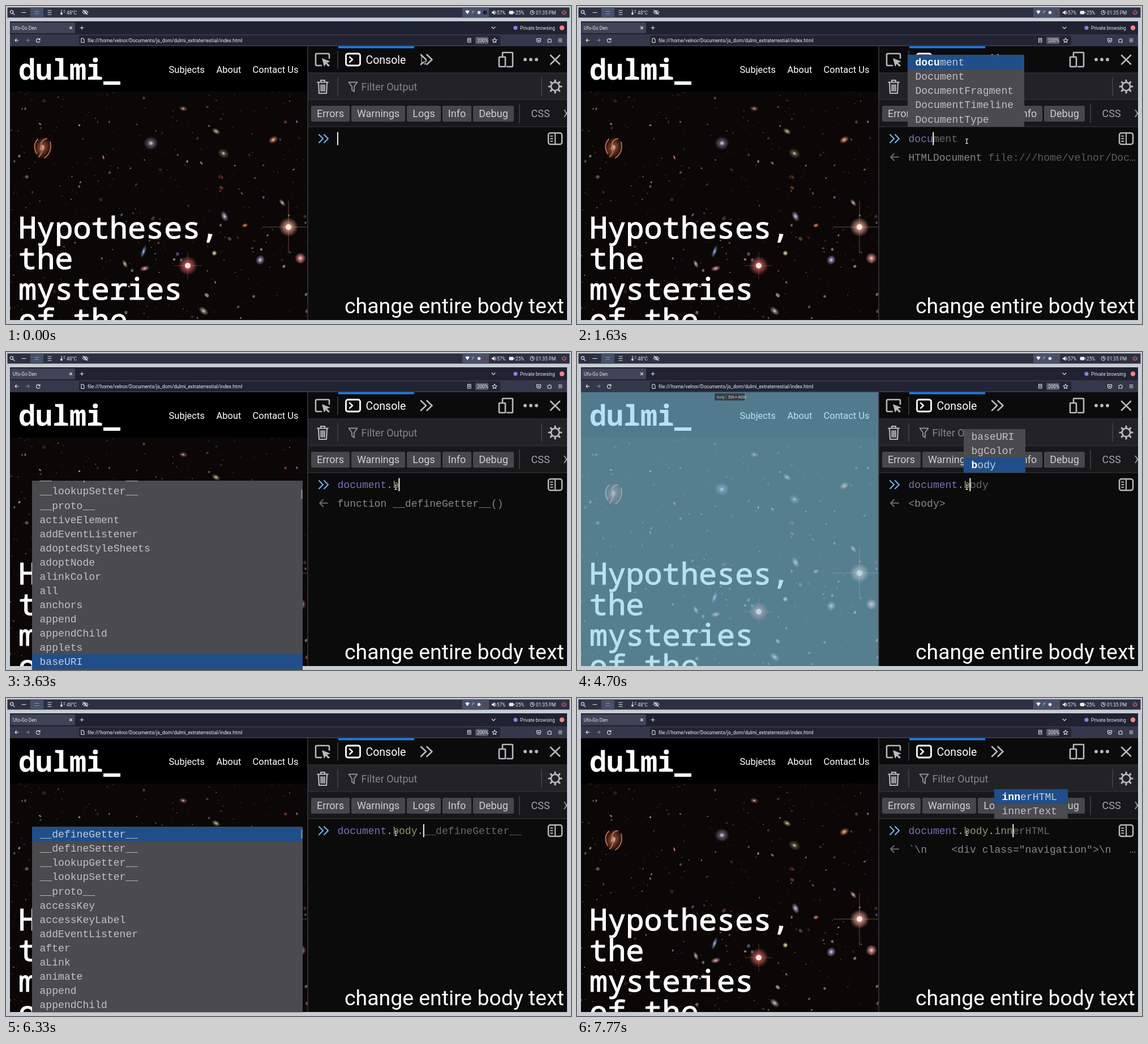
Write an HTML page that moves like this. It is 998 px wide and 561 px high and loops after 8 s.

```html
<!DOCTYPE html>
<html lang="en">
<head>
<meta charset="utf-8">
<title>Console demo</title>
<style>
html, body { margin: 0; width: 100%; height: 100%; overflow: hidden; background: #c7cdd4; }
svg { display: block; width: 998px; height: 561px; font-family: Roboto, sans-serif; }
text { white-space: pre; }
.mono { font: 18.08px "Liberation Mono", monospace; }
.title { font-family: "Noto Sans Mono", monospace; fill: #fff; }
.headline { font-size: 53.6px; font-weight: 400; stroke: #fff; stroke-width: 1.1px; }
.small { font-size: 8.3px; fill: #e4e5ea; }
.tool { font-size: 18px; }
.line { fill: none; stroke-linecap: round; stroke-linejoin: round; }
</style>
</head>
<body>
<svg id="stage" viewBox="0 0 998 561">
  <defs>
    <clipPath id="pageClip"><rect x="7" y="71" width="526" height="483"/></clipPath>
    <clipPath id="windowClip"><rect x="7" y="27" width="984" height="527"/></clipPath>
  </defs>
  <g id="desktop"></g>
  <g id="page" clip-path="url(#pageClip)"></g>
  <g id="tools" clip-path="url(#windowClip)"></g>
  <g id="live"></g>
  <rect id="caret" y="222.5" width="2" height="23" fill="#f4f4f5"/>
  <text x="598" y="542" font-size="37.4" fill="#fff">change entire body text</text>
  <g id="pointer">
    <path id="arrow" d="M0 0V13L3.2 10.2L5.4 15L7.6 14L5.4 9.4H9.6Z" fill="#111" stroke="#ddd" stroke-width="1"/>
    <g id="beam" class="line">
      <path d="M-2-4H2M-2 4H2M0-4V4" stroke="#111" stroke-width="2.4"/>
      <path d="M-2-4H2M-2 4H2M0-4V4" stroke="#eee" stroke-width="1.2"/>
    </g>
  </g>
</svg>
<script>
const LOOP = 8000, CHAR = 10.85, ROW = 25.05, INPUT_X = 585.5;
const $ = id => document.getElementById(id);
const esc = s => s.replace(/&/g, '&amp;').replace(/</g, '&lt;');
const text = (x, y, s, attrs = '') => `<text x="${x}" y="${y}" ${attrs}>${esc(s)}</text>`;
const rect = (x, y, w, h, fill, attrs = '') =>
  `<rect x="${x}" y="${y}" width="${w}" height="${h}" fill="${fill}" ${attrs}/>`;
const line = (d, color = '#b9b9bc', width = 2.6) =>
  `<path class="line" d="${d}" stroke="${color}" stroke-width="${width}"/>`;
const dot = (x, y, r, fill) => `<circle cx="${x}" cy="${y}" r="${r}" fill="${fill}"/>`;
const ring = (x, y, r, color, width) =>
  `<circle cx="${x}" cy="${y}" r="${r}" fill="none" stroke="${color}" stroke-width="${width}"/>`;
const mono = (x, y, s, fill, bold) =>
  text(x, y, s, `class="mono" fill="${fill}"` + (bold ? ' style="font-weight:700"' : ''));

function drawDesktop() {
  const ink = '#dfe1e8';
  const small = (x, y, s) => text(x, y, s, 'class="small"');
  const thin = (d, c = ink) => line(d, c, 1.1);
  $('desktop').innerHTML = [
    rect(0, 0, 998, 561, '#c7cdd4'),
    rect(2.5, 2.5, 993, 18, '#2c3041'),
    rect(43, 2.5, 23, 18, '#465069'),
    ring(10, 10.5, 2.7, ink, 1.2), thin('M12 12.5L15 15.5'),
    thin('M28 11.5H35'), thin('M51 9.5H58M51 13.5H58', '#8b94ac'),
    thin('M74 8H80M74 11.5H80M74 15H80'),
    thin('M98 7V12M102 8H104M102 11H104'), dot(98, 13.5, 2, ink), small(107, 14.8, '48°C'),
    thin('M135 11Q140 5 145 11Q140 17 135 11M136 7L144 15'), ring(140, 11, 1.4, ink, 1),
    rect(806, 2.5, 47, 18, '#48506a'),
    '<path d="M811 9Q815 6 819 9L815 14.5Z" fill="#eee"/>',
    thin('M823 13L827 9M823 9H827', '#8fa39a'),
    dot(835.5, 11.5, 2.8, '#dde4f4'), '<circle id="tray" cx="846" cy="11.5" r="3.5"/>',
    '<path d="M858 10H860L863 7.5V15.5L860 13H858Z" fill="#eee"/>', thin('M864.5 9Q866 11.5 864.5 14'),
    small(867, 14.8, '57%'),
    `<rect x="889" y="9" width="7" height="5" rx="1" fill="#eee" stroke="#eee"/>`, thin('M898 10.5V12.5'),
    small(900, 14.8, '25%'),
    ring(929.5, 11.5, 3.6, ink, 1), thin('M929.5 9V11.5H931.5'), small(936, 14.8, '01:35 PM'),
    thin('M983 9A3.4 3.4 0 1 0 988.5 9M985.8 7V11', '#ef6a7c'),
    rect(7, 27, 984, 527, '#0c0c0d'), rect(7, 27, 984, 23, '#202231'),
    rect(8, 29, 114, 19, '#414457', 'rx="2"'), rect(7, 50, 984, 21, '#35384a'),
    rect(129, 52, 744, 17, '#222433', 'rx="2"'),
    small(12, 41.5, 'Ufo-Go Den'), thin('M112.5 36.5L116.5 40.5M116.5 36.5L112.5 40.5'),
    thin('M131 38.5H137M134 35.5V41.5'), thin('M858 37L861 40L864 37'),
    dot(900, 38.5, 3.6, '#8c7fe6'), small(908, 41.5, 'Private browsing'), dot(982, 38.5, 4.2, '#ef8585'),
    thin('M16 60.5H22M18.5 58L16 60.5L18.5 63'), thin('M35 60.5H41M38.5 58L41 60.5L38.5 63', '#7f8191'),
    thin('M59 58.5A3.3 3.3 0 1 0 60 61.5M60 57V59.5H57.5'),
    thin('M133 57H136L138 59V64.5H133Z'),
    text(144, 63.8, 'file:///home/velnor/Documents/js_dom/dulmi_extraterrestial/index.html', 'font-size="8.57" fill="#eceef3"'),
    thin('M815.5 57H821V64H815.5ZM817 59H819.5M817 61H819.5'),
    rect(829, 54.5, 23, 12.5, '#555868', 'rx="2"'), small(832, 63.8, '200%'),
    thin('M863 56.5L864.2 59.3L867 59.6L865 61.6L865.5 64.5L863 63L860.5 64.5L861 61.6L859 59.6L861.8 59.3Z'),
    thin('M937.5 57.5H944.5V60Q944.5 64 941 64Q937.5 64 937.5 60ZM939.5 60L941 61.5L942.5 60'),
    thin('M957 59H959Q960 56 961.5 59H963V64H957Z'), thin('M976 58H982M976 60.5H982M976 63H982')
  ].join('');
}

// x, y, rx, ry, tilt, colour
const galaxies = [
  [64, 250, 15, 20, 20, '#8f4b35'], [256, 242, 13, 12, 0, '#66647f'], [472, 236, 9, 6, -30, '#d08058'],
  [384, 260, 11, 8, 30, '#5c5d44'], [313, 181, 8, 5, 10, '#76574a'], [371, 221, 8, 5, 30, '#8c9070'],
  [386, 371, 6, 10, -25, '#a48ab4'], [488, 347, 4, 8, -40, '#a97e8c'], [422, 387, 6, 4, -15, '#c0653c'],
  [243, 433, 4, 12, 20, '#6687c4'], [368, 436, 5, 5, 0, '#dccca0'], [449, 448, 8, 9, 30, '#8d8fc0'],
  [520, 445, 10, 10, 0, '#dc8c8c'], [210, 455, 4, 8, -25, '#8d9c78'], [245, 463, 9, 5, -15, '#c0798c'],
  [349, 538, 10, 6, 40, '#8f957f'], [172, 267, 2, 5, -20, '#d77864']
];
const starTints = ['#c8917a', '#8799d4', '#d9d7c8', '#a3594a', '#90a080'];

function drawPage() {
  let seed = 41;
  const rnd = () => (seed = (seed * 16807) % 2147483647) / 2147483647;
  const glows = [...new Set([...galaxies.map(g => g[5]), '#ffb09a', '#e36a68'])];
  const glow = c => `url(#glow${glows.indexOf(c)})`;
  const defs = glows.map((c, i) => `<radialGradient id="glow${i}">
    <stop offset="0" stop-color="${c}"/><stop offset=".4" stop-color="${c}" stop-opacity=".75"/>
    <stop offset="1" stop-color="${c}" stop-opacity="0"/></radialGradient>`).join('');
  const blob = (x, y, rx, ry, tilt, fill, opacity = 1) =>
    `<ellipse cx="${x}" cy="${y}" rx="${rx}" ry="${ry}" transform="rotate(${tilt} ${x} ${y})" fill="${fill}" opacity="${opacity}"/>`;
  let sky = '';
  for (let i = 0; i < 520; i++) {
    const r = .5 + rnd() ** 5 * 2.6;
    sky += blob(7 + rnd() * 526, 151 + rnd() * 403, r, r * (.5 + rnd()), rnd() * 180,
      starTints[Math.floor(rnd() * 5)], .2 + rnd() * .65);
  }
  for (const [x, y, rx, ry, tilt, c] of galaxies)
    sky += blob(x, y, rx, ry, tilt, glow(c)) + blob(x, y, rx * .25, ry * .25, tilt, '#f1d8c8', .6);
  sky += line('M72 234Q60 236 62 249Q66 258 58 266M56 235Q46 246 54 260M78 240Q82 258 68 268', '#b9694a', 2);
  for (const [x, y, c, reach] of [[499, 390, '#ffb09a', 46], [321, 458, '#e36a68', 24]])
    sky += `<g opacity=".45">${line(`M${x - reach} ${y}H${x + reach}M${x} ${y - reach}V${y + reach}`, c, .9)}</g>` +
      blob(x, y, 17, 17, 0, glow(c), .85) + dot(x, y, 5, '#ffe9dc');

  const nav = (x, s) => text(x, 117.7, s, 'font-size="16.5" fill="#fff"');
  const headline = ['Hypotheses,', 'the', 'mysteries', 'of the'].map((s, i) =>
    text(22, 410 + 54 * i, s, 'class="title headline"')).join('');
  $('page').innerHTML = `<defs>${defs}</defs>` + rect(7, 71, 526, 483, '#0b0706') + sky +
    rect(7, 71, 526, 80, '#000') +
    text(22, 130, 'dulmi_', 'class="title" font-size="50" font-weight="700"') +
    nav(287.5, 'Subjects') + nav(371.5, 'About') + nav(435.5, 'Contact Us') + headline +
    '<g id="highlight">' + rect(7, 71, 526, 483, 'skyblue', 'opacity=".6"') +
    rect(243, 73, 53, 12.5, '#3a3d42', 'rx="1.5"') +
    text(247, 81.6, 'body', 'font-size="6.4" fill="#8cc8ec"') + line('M263.5 76V83', '#777', .6) +
    text(267, 81.6, '506 × 4606', 'font-size="6.4" fill="#d6d8dc"') + '</g>';
}

function drawTools() {
  const rule = (x, top, bottom) => line(`M${x} ${top}V${bottom}`, '#4a4a4f', 1.3);
  const button = (x, w, s) => rect(x, 176, w, 28, '#47474b', 'rx="2.5"') +
    text(x + w / 2, 196.2, s, 'class="tool" fill="#cfcfd2" text-anchor="middle"');
  const teeth = [...Array(8).keys()].map(i => {
    const a = i * Math.PI / 4, c = Math.cos(a), s = Math.sin(a);
    return `M${970 + 8 * c} ${142 + 8 * s}L${970 + 11 * c} ${142 + 11 * s}`;
  }).join('');
  $('tools').innerHTML = [
    rect(533, 71, 458, 483, '#0b0b0c'), rect(533, 118, 458, 47, '#232327'), rect(533, 165, 458, 48, '#18181a'),
    ...[118, 165, 213].map(y => line(`M533 ${y}H991`, '#3a3a3f', 1.2)),
    line('M533 71V554', '#3a3a3f', 1.5), rect(587, 71, 134, 3.5, '#1b7fe6'),
    line('M557 105H549Q547 105 547 103V86Q547 84 549 84H569Q571 84 571 86V92'),
    '<path d="M558 92L573 98L567 100L572 105L569 107L565 102L562 107Z" fill="#b9b9bc"/>',
    rule(586, 79, 110),
    `<rect x="600.5" y="84" width="25" height="21" rx="3.5" fill="none" stroke="#fff" stroke-width="2.8"/>`,
    line('M607 90L612 94.5L607 99', '#fff', 2.4),
    text(635.5, 101.7, 'Console', 'font-size="19.5" fill="#fff"'),
    line('M733 86L742 94.5L733 103M743.5 86L752.5 94.5L743.5 103'),
    line('M877 88V83Q877 82 878 82H894Q895 82 895 83V106Q895 107 894 107H885M872 90H881Q882 90 882 91V106Q882 107 881 107H872Q871 107 871 106V91Q871 90 872 90'),
    ...[917, 927, 937].map(x => dot(x, 94.5, 2.9, '#b9b9bc')),
    line('M962 87L978 102.5M978 87L962 102.5'),
    line('M550 134.5H569M556 134V131H563V134M552 135L553 154H566L567 135M556.5 139V150M559.5 139V150M562.5 139V150', '#b9b9bc', 2.2),
    rule(586, 126, 158),
    line('M605.5 134.5H620.5L615 142V151L611 148V142Z', '#909094', 1.9),
    text(627.5, 148.5, 'Filter Output', 'class="tool" fill="#858589"'),
    rule(946, 126, 158), ring(970, 142, 7.2, '#b9b9bc', 2.6), line(teeth, '#b9b9bc', 3.2),
    button(539, 68, 'Errors'), button(610, 95, 'Warnings'), button(708, 60, 'Logs'),
    button(771, 51, 'Info'), button(825, 72, 'Debug'), rule(907, 173, 206),
    text(927.5, 196.2, 'CSS', 'class="tool" fill="#a3a3a7"'), text(984.5, 196.2, 'XHR', 'class="tool" fill="#a3a3a7"'),
    line('M553 227L560 234L553 241M562 227L569 234L562 241', '#74a9ea', 2.3),
    `<rect x="958" y="224" width="24" height="20" rx="3.5" fill="none" stroke="#b9b9bc" stroke-width="2.5"/>`,
    line('M970 224V244M962 229.5H965.5M962 234H965.5M962 238.5H965.5', '#b9b9bc', 2)
  ].join('');
}

const words = s => s.split(' ');
const magic = words('__defineGetter__ __defineSetter__ __lookupGetter__ __lookupSetter__ __proto__');
const wide = { x: 46, y: 227, w: 478, bar: true };
const lists = {
  d: { x: 312, y: 227, w: 271, match: 1, items: words('debugger decodeURI decodeURIComponent default delete devicePixelRatio dispatchEvent do document DataTransfer DataTransferItem DataTransferItemList Date') },
  do: { x: 312, y: 227, w: 271, match: 2, items: words('do document Document DocumentFragment DocumentTimeline DocumentType DOMException DOMImplementation DOMMatrix DOMMatrixReadOnly DOMParser DOMPoint DOMPointReadOnly') },
  doc: { x: 584, y: 86, w: 206, match: 3, items: words('document Document DocumentFragment DocumentTimeline DocumentType') },
  dot: { ...wide, items: [...magic, ...words('activeElement addEventListener adoptedStyleSheets adoptNode alinkColor all anchors append appendChild applets baseURI')] },
  b: { x: 683, y: 136, w: 109, sel: 2, match: 1, items: words('baseURI bgColor body') },
  body: { ...wide, items: [...magic, ...words('accessKey accessKeyLabel addEventListener after aLink animate append appendChild')] },
  i: { x: 473, y: 227, w: 261, match: 1, items: words('id inert innerHTML innerText inputMode insertAdjacentElement insertAdjacentHTML insertAdjacentText insertBefore isConnected isContentEditable isDefaultNamespace isEqualNode') },
  in: { x: 737, y: 254, w: 261, match: 2, items: words('inert innerHTML innerText inputMode insertAdjacentElement insertAdjacentHTML insertAdjacentText insertBefore') },
  inn: { x: 737, y: 161, w: 130, match: 3, items: words('innerHTML innerText') }
};
lists.docu = { ...lists.doc, match: 4 };
lists.scrolled = { ...lists.dot, sel: 15, shift: 70 };

const htmlDoc = 'HTMLDocument file:///home/velnor/Doc…';
const getter = 'function __defineGetter__()';
// start, typed, ghost, list, result
const steps = [
  [0, '', '', '', ''],
  [950, 'd', 'ebugger', 'd', ''],
  [1170, 'do', '', 'do', ''],
  [1330, 'doc', 'ument', 'doc', ''],
  [1480, 'docu', 'ment', 'docu', ''],
  [1570, 'docu', 'ment', 'docu', htmlDoc],
  [1710, 'document', '', '', htmlDoc],
  [2470, 'document.', '__defineGetter__', 'dot', ''],
  [2600, 'document.', '__defineGetter__', 'dot', getter],
  [3610, 'document.b', '', 'scrolled', getter],
  [3700, 'document.b', 'ody', 'b', getter],
  [4210, 'document.b', 'ody', 'b', '<body>'],
  [5300, 'document.body', '', '', '<body>'],
  [6250, 'document.body.', '__defineGetter__', 'body', ''],
  [6400, 'document.body.', '__defineGetter__', 'body', getter],
  [7080, 'document.body.i', 'd', 'i', getter],
  [7270, 'document.body.in', 'ert', 'in', getter],
  [7430, 'document.body.inn', 'erHTML', 'inn', getter],
  [7560, 'document.body.inn', 'erHTML', 'inn', '`\\n    <div class="navigation">\\n   …']
];

function listMarkup({ x, y, w, items, sel = 0, match = 0, shift = 0, bar }) {
  const h = Math.min(items.length * ROW + 2, 561 - y);
  const rows = items.map((s, i) => {
    const top = y + 1 + i * ROW - shift, on = i === sel, bold = on ? match : 0;
    return (on ? rect(x, top - .5, w, ROW + .5, '#204e8a') : '') +
      mono(x + 13.5, top + 18.3, s.slice(0, bold), '#fff', true) +
      mono(x + 13.5 + bold * CHAR, top + 18.3, s.slice(bold), on ? '#bccbe0' : '#c2c2c6');
  }).join('');
  return `<clipPath id="listClip">${rect(x, y, w, h, '#000')}</clipPath><g clip-path="url(#listClip)">` +
    rect(x, y, w, h, '#4a4a4f') + rows + (bar ? rect(x + w - 2.5, shift ? 243 : 232, 2, 16, '#8f8f94') : '') + '</g>';
}

function show([, typed, ghost, list, result]) {
  const at = n => INPUT_X + n * CHAR;
  let s = '', pos = 0;
  typed.split(/(\.)/).forEach((part, i) => {
    s += mono(at(pos), 239.5, part, part === '.' ? '#a2a2a6' : i ? '#8c9868' : '#7a70b4');
    pos += part.length;
  });
  s += mono(at(pos), 239.5, ghost, '#68686c');
  if (result) {
    const cut = result === htmlDoc ? 13 : result.length;
    s += line('M554 266.5H568M560 260.5L554 266.5L560 272.5', '#6a6a6d', 2) +
      mono(at(0), 272.5, result.slice(0, cut), '#87878b') + mono(at(cut), 272.5, result.slice(cut), '#5c5c60');
  }
  $('live').innerHTML = s + (list ? listMarkup(lists[list]) : '');
  $('caret').setAttribute('x', at(typed.length) - .6);
  $('highlight').style.display = result === '<body>' ? '' : 'none';
}

drawDesktop();
drawPage();
drawTools();

let shown = -1;
const begun = performance.now();
function frame(now) {
  const t = Math.max(0, now - begun) % LOOP;
  const index = steps.findLastIndex(s => s[0] <= t);
  if (index !== shown) show(steps[shown = index]);

  const key = steps.find(s => s[1] === steps[index][1])[0];
  const idle = t - (key || -170);
  $('caret').style.display = idle % 1000 < 500 ? '' : 'none';

  const k = Math.min(1, Math.max(0, (t - 30) / 770)), ease = k * k * (3 - 2 * k);
  const y = 88 + 150.5 * ease, typing = y > 214;
  $('pointer').setAttribute('transform', `translate(${734 - 45.5 * ease} ${y})`);
  $('arrow').style.display = typing ? 'none' : '';
  $('beam').style.display = typing ? '' : 'none';
  $('tray').setAttribute('fill', t < 400 ? '#1d2028' : '#6e3f35');
  requestAnimationFrame(frame);
}
frame(begun);
</script>
</body>
</html>
```
